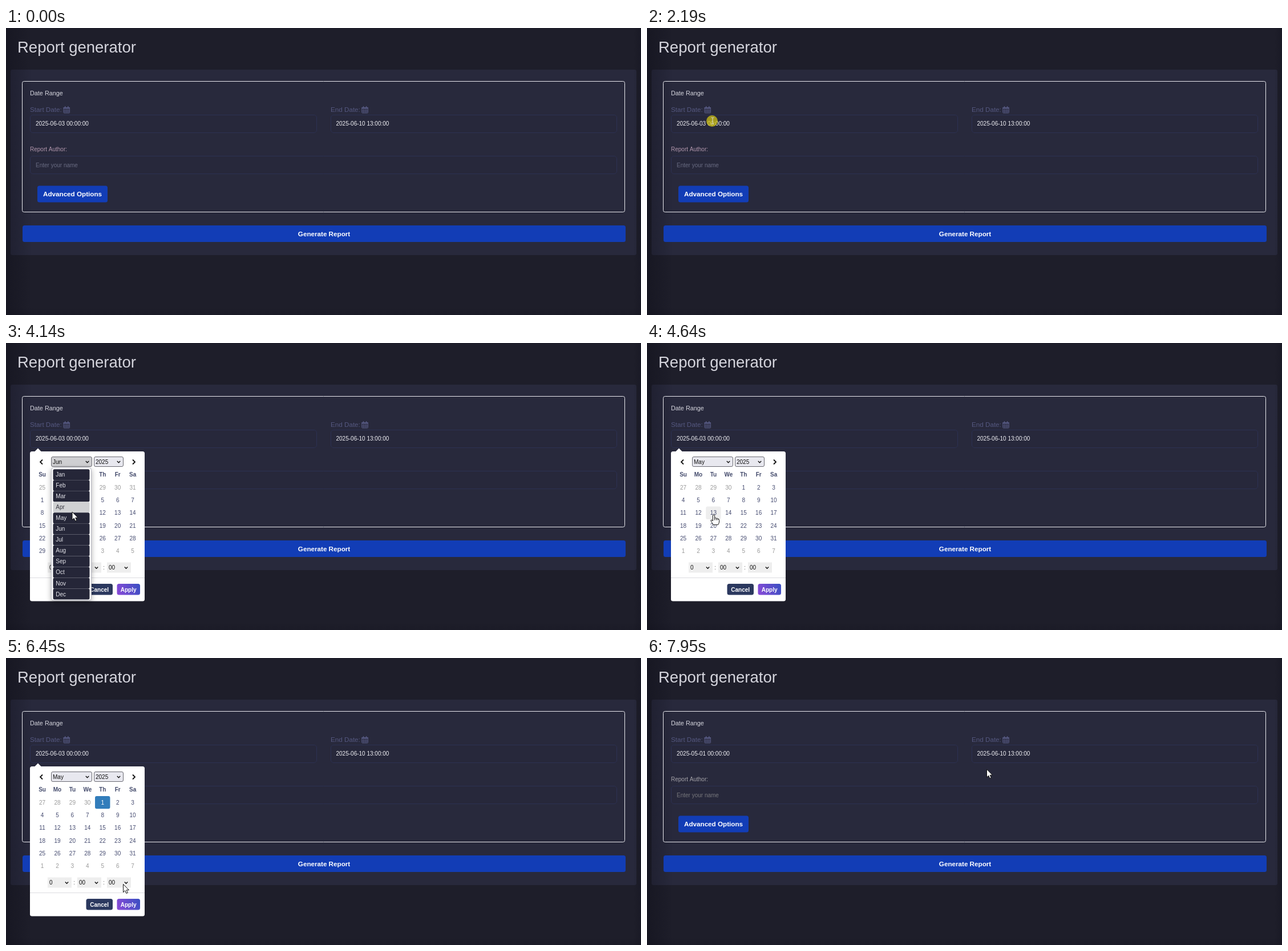
Animation, 1113 px wide and 503 px high, one loop 8 s. Source, as an HTML page with a canvas:

```html
<!DOCTYPE html>
<html lang="en">
<head>
<meta charset="utf-8">
<title>Report generator</title>
<style>
html, body { margin: 0; width: 100%; height: 100%; overflow: hidden; background: #1e1e2a; }
canvas { display: block; width: 1113px; height: 503px; }
</style>
</head>
<body>
<canvas id="stage" width="1113" height="503"></canvas>
<script>
const W = 1113, H = 503, LOOP = 8000;
const ctx = document.getElementById('stage').getContext('2d');
const SANS = '"Liberation Sans", Arial, sans-serif';
const MONTHS = 'Jan Feb Mar Apr May Jun Jul Aug Sep Oct Nov Dec'.split(' ');
const DAYS = 'Su Mo Tu We Th Fr Sa'.split(' ');

// Moments of the hard changes
const T = {
  cursor: 1280, popup: 2310, list: 3420, picked: 4540,
  selected: 5740, closed: 7050
};
const CLICKS = [[2190, 2310], [3320, 3420], [6950, 7050]];

// Cursor moves: first change, last change, steps, destination
const START = [230, 448];
const MOVES = [
  [1280, 1990, 8, 114, 163],
  [2700, 3120, 5, 147, 210],
  [3520, 4020, 6, 121, 284],
  [4140, 4140, 1, 116, 296],
  [4240, 4340, 2, 117, 301],
  [4940, 5440, 6, 170.5, 251],
  [6050, 6450, 5, 205.5, 396.5],
  [6550, 6850, 4, 222, 427],
  [7450, 7950, 6, 595.5, 195]
];

// Calendar and month list geometry
const GRID = { x: 50.3, y: 242, w: 26.43, h: 22.3 };
const LIST = { x: 82.5, y: 221.2, w: 64, h: 19.03 };

const ARROW = new Path2D('M0,0V14L3.2,11.1L5.4,16L7.8,15L5.7,10.2H10Z');
const HAND = new Path2D('M-1.6,1Q0,-1 1.6,1V5.8Q3.4,4.8 4.4,6.4Q6,5.4 7,7.2Q9.6,6.8 9.6,9.4V12Q9.4,15 7.6,17.6H-.6L-4.2,12.2Q-6,9.6 -4.4,9Q-3,8.6 -1.6,11Z');
const FINGERS = new Path2D('M1.6,6V9.5M4.4,6.6V9.5M7,7.4V9.5');
const IBEAM = new Path2D('M-2.5,-5.5H-.8L0,-4.8L.8,-5.5H2.5M0,-5V5M-2.5,5.5H-.8L0,4.8L.8,5.5H2.5');

const smooth = p => p * p * (3 - 2 * p);
const inside = (p, x, y, w, h) => p.x >= x && p.x < x + w && p.y >= y && p.y < y + h;

function cursorAt(t) {
  let [x, y] = START;
  for (const [from, to, n, nx, ny] of MOVES) {
    if (t < from) break;
    const step = n > 1 ? (to - from) / (n - 1) : 1;
    const p = smooth(Math.min(1, (Math.floor((t - from) / step + 1e-6) + 1) / n));
    x += (nx - x) * p;
    y += (ny - y) * p;
  }
  return { x, y };
}

function text(s, x, y, size, color, bold, align = 'left') {
  ctx.font = `${bold ? 'bold ' : ''}${size}px ${SANS}`;
  ctx.textAlign = align;
  ctx.fillStyle = color;
  ctx.fillText(s, x, y);
}

function box(x, y, w, h, r, fill, stroke) {
  ctx.beginPath();
  ctx.roundRect(x, y, w, h, r);
  if (fill) { ctx.fillStyle = fill; ctx.fill(); }
  if (stroke) { ctx.strokeStyle = stroke; ctx.lineWidth = 1; ctx.stroke(); }
}

function line(points, color, width) {
  ctx.beginPath();
  points.forEach(([x, y]) => ctx.lineTo(x, y));
  ctx.strokeStyle = color;
  ctx.lineWidth = width;
  ctx.stroke();
}

function shade(x0, y0, x1, y1, alpha) {
  const g = ctx.createLinearGradient(x0, y0, x1, y1);
  g.addColorStop(0, `rgba(8,8,18,${alpha})`);
  g.addColorStop(1, 'rgba(8,8,18,0)');
  ctx.fillStyle = g;
  ctx.fillRect(0, 0, W, H);
}

function calendarIcon(x, y) {
  const c = '#555880';
  box(x + .5, y + 2, 10.5, 9.5, 1, null, c);
  ctx.fillStyle = c;
  ctx.fillRect(x, y + 1.5, 11.5, 2.5);
  for (let i = 1; i < 4; i++) ctx.fillRect(x + .2 + i * 2.65, y + 4, .8, 7.5);
  for (let i = 1; i < 3; i++) ctx.fillRect(x, y + 3.8 + i * 2.5, 11.5, .8);
  ctx.fillRect(x + 2.3, y - .3, 1.8, 3);
  ctx.fillRect(x + 7.4, y - .3, 1.8, 3);
}

function field(x, y, w, focused) {
  box(x + .5, y + .5, w - 1, 31, 4.5, focused ? '#25263a' : '#27283b', focused ? '#1743c4' : '#2c3152');
}

function page(t, cur, open) {
  ctx.fillStyle = '#1e1e2a';
  ctx.fillRect(0, 0, W, H);
  box(8, 73, 1097, 325, 3, '#28293c');
  shade(0, 0, 46, 0, .3);
  shade(W, 0, W - 14, 0, .18);
  shade(0, H, 0, H - 14, .12);

  text('Report generator', 20, 43, 27.5, '#d4d4dc');
  box(28.5, 93.5, 1056, 229, 3, null, '#e9e9ee');
  text('Date Range', 42, 117.5, 10.83, '#d6d6de');

  text('Start Date:', 42, 147, 11.67, '#555880');
  calendarIcon(100.5, 137.5);
  text('End Date:', 569, 147, 11.67, '#555880');
  calendarIcon(623.3, 137.5);

  field(42, 152, 503, t >= T.popup && t < T.list);
  field(569, 152, 502);
  const start = t < T.closed ? '2025-06-03' : '2025-05-01';
  text(start + ' 00:00:00', 52, 171.3, 10, '#f0f0f4');
  text('2025-06-10 13:00:00', 578.5, 171.3, 10, '#f0f0f4');

  const late = t >= T.closed;
  text('Report Author:', 42, 216, 10, late ? '#a5a3a9' : '#b297ad');
  field(42, 224, 1029);
  text('Enter your name', 52, 243.5, 10, late ? '#77777c' : '#696b82');

  const over = (...r) => !open && t >= T.cursor && inside(cur, ...r);
  box(55, 276.5, 123, 29, 3.5, over(55, 276, 123, 30) ? '#0f3499' : '#123db6');
  text('Advanced Options', 116.5, 295.3, 11.67, '#fff', true, 'center');
  box(29, 346, 1057, 29, 3.5, over(29, 346, 1057, 29) ? '#0f3499' : '#123db6');
  text('Generate Report', 557.5, 364.8, 11.67, '#fff', true, 'center');
}

function select(x, y, w, h, label, bordered, fill) {
  if (bordered) box(x + .5, y + .5, w - 1, h - 1, 2.5, fill, '#6a6a72');
  else box(x, y, w, h, 0, fill);
  text(label, x + 3, y + h / 2 + 3.6, 10, '#111');
  const cx = x + w - 8.5, cy = y + h / 2;
  line([[cx - 2.7, cy - 1], [cx, cy + 1.7], [cx + 2.7, cy - 1]], '#111', 1.4);
}

function days(month, picked, cur) {
  const col = Math.floor((cur.x - GRID.x) / GRID.w);
  const row = Math.floor((cur.y - GRID.y) / GRID.h);
  const first = new Date(2025, month, 1).getDay() || 7;
  DAYS.forEach((d, i) => text(d, GRID.x + (i + .5) * GRID.w, 234, 10, '#434a6b', true, 'center'));
  for (let i = 0; i < 42; i++) {
    const date = new Date(2025, month, 1 - first + i);
    const c = i % 7, r = Math.floor(i / 7);
    const x = GRID.x + c * GRID.w, y = GRID.y + r * GRID.h;
    const own = date.getMonth() === month;
    const chosen = own && date.getDate() === picked;
    if (chosen) box(x, y, GRID.w, GRID.h, 3, '#327dbb');
    else if (c === col && r === row) box(x, y, GRID.w, GRID.h, 3, '#eee');
    text(date.getDate(), x + GRID.w / 2, y + 14.6, 10, chosen ? '#fff' : own ? '#454b70' : '#999', false, 'center');
  }
}

function monthList(cur) {
  ctx.save();
  ctx.shadowColor = 'rgba(0,0,0,.35)';
  ctx.shadowBlur = 10;
  ctx.shadowOffsetY = 3;
  box(79.5, 218.5, 70, 232.5, 4, '#fff');
  ctx.restore();
  box(79.5, 218.5, 70, 232.5, 4, '#fff', '#b9b9c4');
  const at = Math.floor((cur.y - LIST.y) / LIST.h);
  const hover = at < 0 ? 5 : at;
  MONTHS.forEach((m, i) => {
    const y = LIST.y + i * LIST.h;
    box(LIST.x, y, LIST.w, LIST.h, 2.5, i === hover ? '#d0d1d3' : '#252638');
    text(m, 87.3, y + 13, 10, i === hover ? '#3a3a44' : '#e4e4ea');
  });
}

function popup(t, cur) {
  const listOpen = t >= T.list && t < T.picked;
  const month = t < T.picked ? 5 : 4;
  const picked = t < T.picked ? 3 : t < T.selected ? 0 : 1;

  box(42, 190, 201, 262.5, 3.5, '#fff');
  ctx.beginPath();
  ctx.moveTo(50, 190.5);
  ctx.lineTo(56, 184.5);
  ctx.lineTo(62, 190.5);
  ctx.fill();

  line([[64, 204.5], [60, 208.5], [64, 212.5]], '#111', 1.8);
  line([[222, 204.5], [226, 208.5], [222, 212.5]], '#111', 1.8);
  const hot = listOpen || inside(cur, 79, 199, 72, 18);
  select(79, 199, 72, 18, MONTHS[month], true, hot ? '#cfcfd2' : '#e8e8ef');
  select(154, 199, 52, 18, '2025', true, '#e8e8ef');

  days(month, picked, listOpen ? { x: 0, y: 0 } : cur);

  ['0', '00', '00'].forEach((v, i) => {
    const x = 73 + i * 52;
    select(x, 384.5, 42, 18, v, false, '#eee');
    if (i) text(':', x - 5.5, 396.5, 11, '#777', false, 'center');
  });

  line([[42, 411.5], [243, 411.5]], '#dcdce0', 1);
  box(140.5, 422, 46.5, 19.5, 3.5, '#2b385e');
  text('Cancel', 163.7, 435.5, 10, '#fff', true, 'center');
  const g = ctx.createLinearGradient(194, 440, 235, 424);
  g.addColorStop(0, '#8b4ad8');
  g.addColorStop(1, '#3a4fc2');
  box(194.5, 422, 40.5, 19.5, 3.5, g);
  text('Apply', 214.6, 435.5, 10, '#fff', true, 'center');

  if (listOpen) monthList(cur);
}

function cursorKind(t, cur, open) {
  if (inside(cur, 42, 152, 503, 32)) return 'text';
  if (open) {
    if (t >= T.list && t < T.picked) return 'arrow';
    const hand = inside(cur, GRID.x, GRID.y, 7 * GRID.w, 6 * GRID.h) || inside(cur, 194, 422, 41, 20);
    return hand ? 'hand' : 'arrow';
  }
  const button = inside(cur, 55, 276, 123, 30) || inside(cur, 29, 346, 1057, 29);
  return button ? 'hand' : 'arrow';
}

function drawCursor(t, cur, open) {
  if (t < T.cursor) return;
  if (CLICKS.some(([a, b]) => t >= a && t < b)) {
    ctx.beginPath();
    ctx.arc(cur.x, cur.y, 10, 0, 7);
    ctx.fillStyle = 'rgba(205,192,20,.75)';
    ctx.fill();
  }
  const kind = cursorKind(t, cur, open);
  ctx.save();
  ctx.translate(cur.x, cur.y);
  ctx.lineJoin = 'round';
  ctx.lineWidth = 1;
  if (kind === 'text') {
    ctx.translate(1, -.5);
    ctx.strokeStyle = '#dcdcd4';
    ctx.stroke(IBEAM);
  } else {
    const shape = kind === 'hand' ? HAND : ARROW;
    ctx.fillStyle = '#fff';
    ctx.strokeStyle = '#111';
    ctx.fill(shape);
    ctx.stroke(shape);
    if (kind === 'hand') ctx.stroke(FINGERS);
  }
  ctx.restore();
}

function draw(t) {
  const cur = cursorAt(t);
  const open = t >= T.popup && t < T.closed;
  page(t, cur, open);
  if (open) popup(t, cur);
  drawCursor(t, cur, open);
}

const begin = performance.now();
function tick() {
  draw((performance.now() - begin) % LOOP);
  requestAnimationFrame(tick);
}
tick();
</script>
</body>
</html>
```
